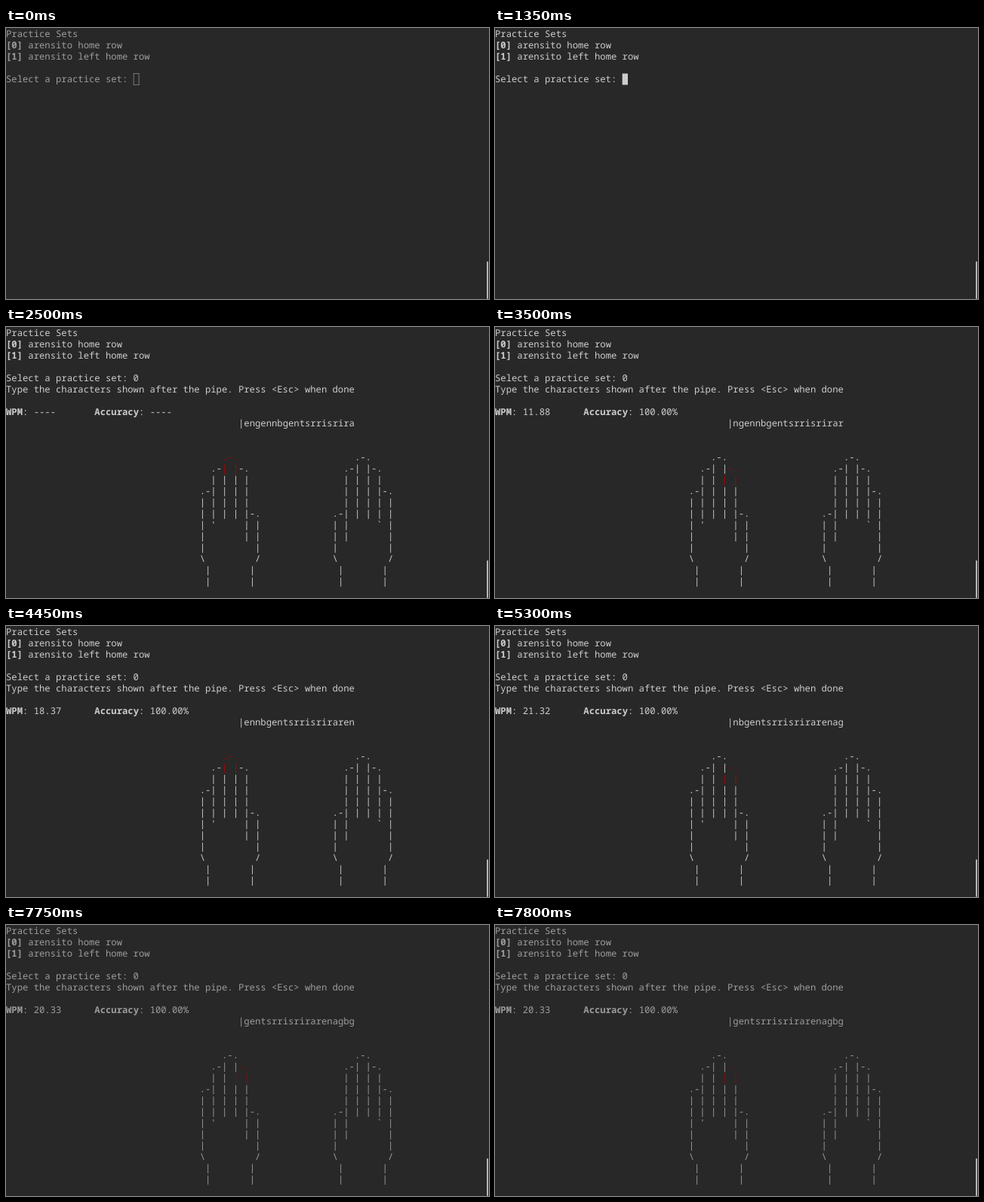
Recreate the animation shown at these times as an HTML page. Size 640 by 360 pixels, loop 8250 ms.

```html
<!DOCTYPE html>
<html lang="en">
<head>
<meta charset="utf-8">
<title>Typing practice</title>
<style>
  html, body { margin: 0; width: 100%; height: 100%; overflow: hidden; background: #282828; }
  svg { display: block; width: 640px; height: 360px; }
  text {
    font-family: "Noto Sans Mono", "DejaVu Sans Mono", monospace;
    font-size: 12.2222px;
    white-space: pre;
    text-rendering: geometricPrecision;
    fill: #cdcdcd;
  }
  .bold { font-weight: 700; }
  .red { fill: #ad0000; }
</style>
</head>
<body>
<svg viewBox="0 0 640 360" xmlns="http://www.w3.org/2000/svg">
  <rect width="640" height="360" fill="#282828"/>
  <g id="screen"></g>
  <rect x="637" y="310" width="2" height="50" rx="1" fill="#b8b8b8"/>
</svg>
<script>
const LOOP = 8250;
const CELL = 22 / 3, LINE = 15;
const PROMPT = "Select a practice set: ";
const LETTERS = "engennbgentsrrisrirarenagbg";
const HAND_ROW = 11, HAND_COL = 35;

const HANDS = [
  "    .-.                     .-.",
  "  .-| |-.                 .-| |-.",
  "  | | | |                 | | | |",
  ".-| | | |                 | | | |-.",
  "| | | | |                 | | | | |",
  "| | | | |-.             .-| | | | |",
  "| '     | |             | |     ` |",
  "|       | |             | |       |",
  "|         |             |         |",
  "\\         /             \\         /",
  " |       |               |       |",
  " |       |               |       |"
];

// Fingertip cells as [row, first column, last column] within HANDS
const FINGERS = {
  leftMiddle: [[0, 4, 6], [1, 4, 6]],
  leftIndex: [[1, 7, 8], [2, 6, 8]],
  rightIndex: [[1, 26, 27], [2, 26, 28]]
};
const FINGER_OF = { e: "leftMiddle", n: "leftIndex", g: "leftIndex", b: "rightIndex" };

// One entry per typed letter: time and resulting speed
const STROKES = [
  [2500, "----"], [3500, "11.88"], [3950, "16.45"], [4450, "18.37"],
  [4850, "20.34"], [5300, "21.32"], [5750, "22.02"], [6550, "20.33"]
];

const screen = document.getElementById("screen");
const escapeText = s => s.replace(/&/g, "&amp;").replace(/</g, "&lt;");

function put(row, col, string, style = "") {
  return `<text class="${style}" x="${col * CELL}" y="${12 + row * LINE}">${escapeText(string)}</text>`;
}

function cursor(col, hollow) {
  const x = col * CELL;
  return hollow
    ? `<rect x="${x + 0.5}" y="60.5" width="7" height="15" fill="none" stroke="#999"/>`
    : `<rect x="${x}" y="60.5" width="${CELL}" height="15" fill="#cdcdcd"/>`;
}

function menu() {
  const items = ["arensito home row", "arensito left home row"];
  return put(0, 0, "Practice Sets") + items.map((name, i) =>
    put(i + 1, 0, `[${i}]`, "bold") + put(i + 1, 4, name)).join("");
}

function hands(finger) {
  const isLit = (row, col) =>
    FINGERS[finger].some(([r, from, to]) => r === row && col >= from && col <= to);
  return HANDS.map((line, row) => {
    const pick = lit => [...line].map((c, col) => isLit(row, col) === lit ? c : " ").join("");
    const red = pick(true);
    return put(HAND_ROW + row, HAND_COL, pick(false)) +
      (red.trim() ? put(HAND_ROW + row, HAND_COL, red, "red") : "");
  }).join("");
}

function practice(t) {
  const typed = STROKES.filter(([start]) => t >= start).length - 1;
  return put(5, 0, "Type the characters shown after the pipe. Press <Esc> when done") +
    put(7, 0, "WPM", "bold") + put(7, 3, ": " + STROKES[typed][1]) +
    put(7, 16, "Accuracy", "bold") + put(7, 24, typed ? ": 100.00%" : ": ----") +
    put(8, 42, "|" + LETTERS.slice(typed, typed + 20)) +
    hands(FINGER_OF[LETTERS[typed]]);
}

function picture(t) {
  const focused = t >= 150 && t < 7750;
  const chosen = t >= 1950;
  let body = menu() + put(4, 0, PROMPT + (chosen ? "0" : ""));
  if (t >= 2500) body += practice(t);
  else if (chosen) body += cursor(PROMPT.length + 1, false);
  else if (t < 750 || t >= 1350) body += cursor(PROMPT.length, !focused);
  return `<g opacity="${focused ? 1 : 0.7}">${body}</g>`;
}

const startTime = performance.now();
let shown = "";
function frame() {
  const next = picture((performance.now() - startTime) % LOOP);
  if (next !== shown) screen.innerHTML = shown = next;
  requestAnimationFrame(frame);
}
frame();
</script>
</body>
</html>
```
